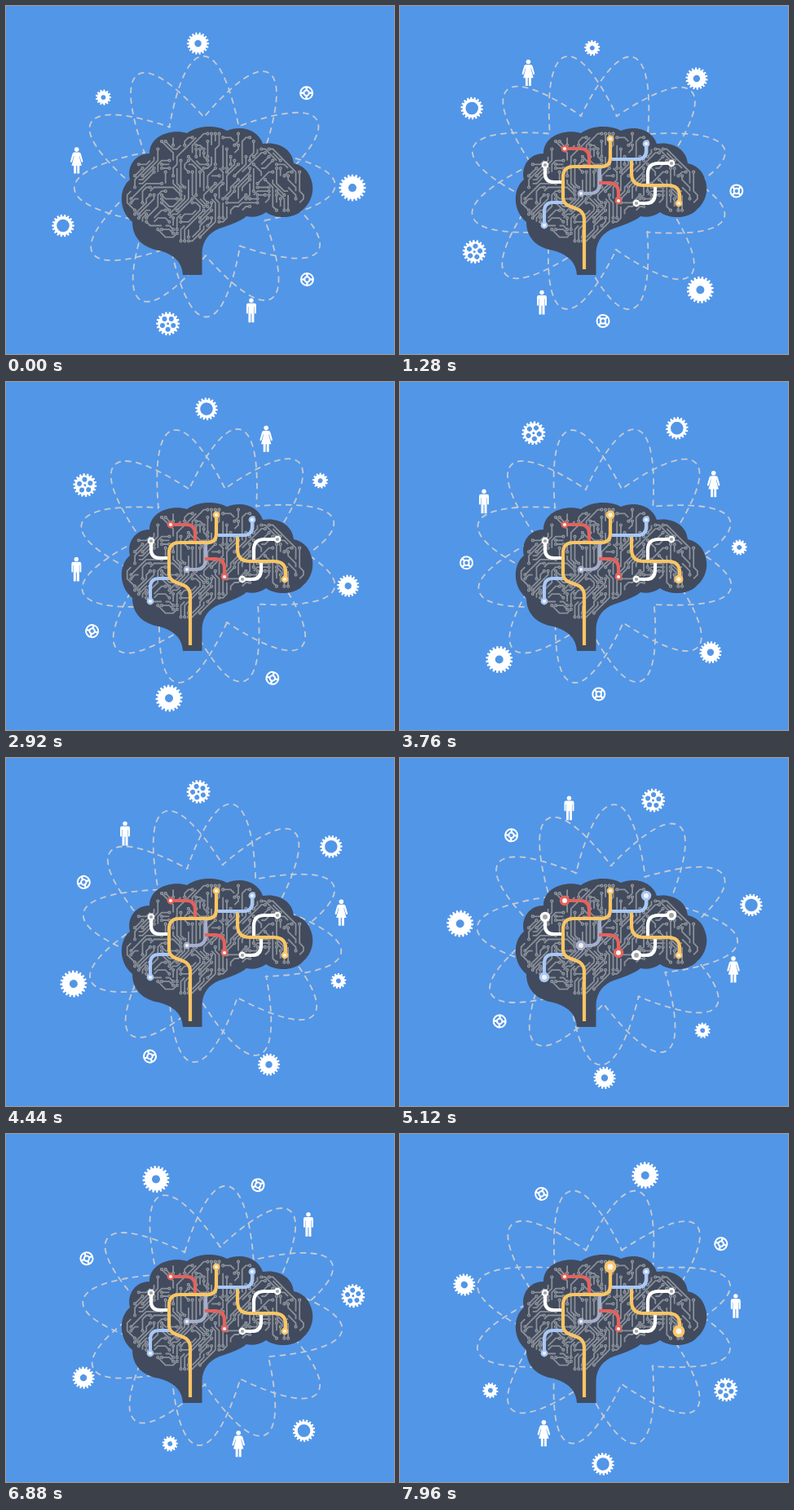
An HTML page that plays this animation: 476 by 427 pixels, repeating every 8 s.

```html
<!DOCTYPE html>
<html lang="en">
<head>
<meta charset="utf-8">
<title>Brain orbit</title>
<style>
html, body { margin: 0; width: 100%; height: 100%; overflow: hidden; background: #5296e8; }
svg { display: block; width: 100vw; height: 100vh; }
</style>
</head>
<body>
<svg id="stage" viewBox="0 0 476 427">
  <rect width="476" height="427" fill="#5296e8"/>
  <g id="orbit">
    <g id="petals" fill="none" stroke="#c6cbd1" stroke-width="1.800" stroke-dasharray="7.500 5.500"/>
    <g id="icons" fill="#fff"/>
  </g>
  <path id="brain" fill="#414b5d" d="M217 330H240.500V303C241 288 249 278 262 273C276 268 288 264 295 258C303 260 312 258 319 253C332 262 354 261 364 250C376 240 379 224 374 212C371 202 363 195 353 193C351 175 334 166 315 169C309 151 288 146 271 153C258 146 236 146 222 156C203 150 176 159 176 181C159 181 148 196 152 213C139 223 137 250 155 265C155 285 169 297 188 300C206 305 216 314 217 330Z"/>
  <path id="traces" fill="none" stroke="#8b9099" stroke-width="1.800" stroke-linejoin="round"/>
  <path id="pads" fill="#5b6370" stroke="#969ba3" stroke-width="1.200"/>
  <g id="wires" fill="none" stroke-width="4.200"/>
  <g id="nodes"/>
</svg>
<script>
const LOOP = 8000, SPEED = 35.9, CX = 249, CY = 219;
const RAD = Math.PI / 180;
const byId = id => document.getElementById(id);
const polar = (r, deg, x = 0, y = 0) => [x + r * Math.cos(deg * RAD), y + r * Math.sin(deg * RAD)];
const pt = p => p.map(v => v.toFixed(2)).join(' ');

function add(parent, tag, attrs = {}) {
  const el = document.createElementNS('http://www.w3.org/2000/svg', tag);
  for (const k in attrs) el.setAttribute(k, attrs[k]);
  return parent.appendChild(el);
}

// Two interlaced rosettes, six petals each
function rosette(start) {
  let d = '';
  for (let i = 0; i < 6; i++) {
    const axis = start + i * 60;
    const at = (u, v) => pt(polar(Math.hypot(u, v), axis + Math.atan2(v, u) / RAD, CX - 5.2, CY + 2.5));
    d += (i ? 'L' : 'M') + at(73.5, -42.5) +
      `C${at(108, -36)} ${at(160, -22)} ${at(160, 0)}C${at(160, 22)} ${at(108, 36)} ${at(73.5, 42.5)}`;
  }
  return d + 'Z';
}
[-0.7, 29.3].forEach(a => add(byId('petals'), 'path', { d: rosette(a) }));

const disc = (r, x = 0, y = 0) => `M${x - r} ${y}a${r} ${r} 0 1 0 ${2 * r} 0a${r} ${r} 0 1 0 ${-2 * r} 0Z`;

function gear(r, teeth, depth) {
  const step = 360 / teeth, pts = [];
  for (let i = 0; i < teeth; i++) {
    [[-.32, r - depth], [-.2, r], [.2, r], [.32, r - depth]]
      .forEach(([f, q]) => pts.push(pt(polar(q, (i + f) * step))));
  }
  return 'M' + pts.join('L') + 'Z';
}

const cog = (r, teeth, depth, hole) => g =>
  add(g, 'path', { d: gear(r, teeth, depth) + disc(hole), 'fill-rule': 'evenodd' });

function wheel(g) {
  let d = gear(14.5, 18, 2.4) + disc(1.5);
  for (let i = 0; i < 5; i++) d += disc(3, ...polar(7, 90 + i * 72));
  add(g, 'path', { d, 'fill-rule': 'evenodd' });
}

function dial(g) {
  const line = { fill: 'none', stroke: '#fff', 'stroke-width': 2 };
  add(g, 'circle', { r: 7.5, ...line });
  add(g, 'circle', { r: 3.2, ...line });
  add(g, 'path', { d: 'M-7 0H-3M3 0H7M0-7V-3M0 3V7', ...line, 'stroke-width': 2.4 });
}

function man(g) {
  add(g, 'circle', { cy: -12.2, r: 2.7 });
  add(g, 'path', { d: 'M-3.800-8.800H3.800Q6-8.800 6-6.500V3Q6 4 5 4Q4 4 4 3V-4.500H3.500V14.800H.5V4H-.5V14.800H-3.500V-4.500H-4V3Q-4 4-5 4Q-6 4-6 3V-6.500Q-6-8.800-3.800-8.800Z' });
}

function woman(g) {
  add(g, 'circle', { cy: -13.3, r: 2.8 });
  add(g, 'path', { d: 'M-3-9.800H3Q4.600-9.800 5.200-8L7.700 1Q7.800 2.200 6.900 2.400Q6 2.500 5.700 1.600L3.500-5.500H3L6.200 6.500H3.500V16.200H.6V6.500H-.6V16.200H-3.500V6.500H-6.200L-3-5.500H-3.500L-5.700 1.600Q-6 2.500-6.900 2.400Q-7.800 2.200-7.700 1L-5.200-8Q-4.600-9.800-3-9.800Z' });
}

const upright = [];
[
  [265.5, 173.5, cog(13.6, 18, 2.5, 4.2)],
  [219.5, 168, cog(9.6, 13, 2, 2.9)],
  [190.3, 165, woman],
  [164.2, 186, cog(13.8, 18, 2.4, 7.8)],
  [106.4, 178, wheel],
  [71.4, 163, man],
  [44, 167.5, dial],
  [1.3, 176, cog(16.5, 20, 2.7, 5)],
  [-43.2, 164, dial]
].forEach(([angle, r, draw]) => {
  const g = add(byId('icons'), 'g', { transform: `translate(${pt(polar(r, angle, CX, CY))})` });
  const inner = add(g, 'g');
  draw(inner);
  if (draw === man || draw === woman) upright.push(inner);
});

// Circuit traces: seeded walks on a grid that never touch each other
function etch() {
  let seed = 29;
  const rnd = () => (seed = seed * 16807 % 2147483647) / 2147483647;
  const STEP = 4.7, used = new Set(), cuts = new Set();
  const brain = byId('brain'), probe = byId('stage').createSVGPoint();
  const dirs = [[0, 1], [1, 1], [1, 0], [1, -1], [0, -1], [-1, -1], [-1, 0], [-1, 1]];
  const xy = (c, r) => [144 + c * STEP, 152 + r * STEP];
  const inside = (x, y) => {
    probe.x = x; probe.y = y;
    return brain.isPointInFill(probe);
  };
  const free = (c, r) => {
    const [x, y] = xy(c, r);
    return y < Math.min(293, 250 + .65 * (x - 144)) && !used.has(c + ',' + r) &&
      dirs.every(([dx, dy]) => inside(x + dx * 4.5, y + dy * 4.5));
  };
  // Slanted on both flanks, mostly upright in the middle
  const leaning = (x, y) => x < 200 ? (y < 200 ? [0, 1, 3] : [3, 3, 2, 1]) :
    x > 305 ? [3, 3, 0, 1] : [0, 0, 0, 3, 1];
  const cells = [];
  for (let c = 0; c < 50; c++) for (let r = 0; r < 31; r++) cells.push([c, r, rnd()]);
  cells.sort((a, b) => a[2] - b[2]);
  let lines = '', pads = '';
  for (const [c0, r0] of cells) {
    if (!free(c0, r0)) continue;
    const zone = leaning(...xy(c0, r0));
    let dir = zone[Math.floor(rnd() * zone.length)] + (rnd() < .5 ? 4 : 0);
    let c = c0, r = r0;
    const path = [xy(c, r)], length = 4 + rnd() * 7;
    used.add(c + ',' + r);
    while (path.length < length) {
      const turn = rnd() < .5 ? 1 : 7;
      const order = rnd() < .2 ? [turn, 0, 8 - turn] : [0, turn, 8 - turn];
      const next = order.map(o => (dir + o) % 8).find(k => {
        const [dx, dy] = dirs[k];
        return free(c + dx, r + dy) && !(dx && dy && cuts.has((2 * c + dx) + ',' + (2 * r + dy)));
      });
      if (next === undefined) break;
      dir = next;
      const [dx, dy] = dirs[dir];
      cuts.add((2 * c + dx) + ',' + (2 * r + dy));
      c += dx; r += dy;
      used.add(c + ',' + r);
      path.push(xy(c, r));
    }
    if (path.length < 3) continue;
    lines += 'M' + path.map(pt).join('L');
    pads += disc(1.5, ...path[path.length - 1]);
    if (rnd() < .3) pads += disc(1.5, ...path[0]);
  }
  byId('traces').setAttribute('d', lines);
  byId('pads').setAttribute('d', pads);
}
etch();

const YELLOW = '#fac564', RED = '#e5625c', BLUE = '#a8c8f6', LILAC = '#a5aecb', WHITE = '#fff';
const wires = [
  [BLUE, 'M260 188H291Q302 188 302 178V169', 302, 169, 350],
  [BLUE, 'M200 241H188Q177 241 177 252V269', 177, 269, 400],
  [LILAC, 'M245 198V217Q245 230 233 230H222', 222, 230, 450],
  [RED, 'M232 196V186Q232 175 221 175H202', 202, 175, 400],
  [RED, 'M244 217H256Q268 217 268 229V239', 268, 239, 500],
  [WHITE, 'M198 216H189Q178 216 178 206V195', 178, 195, 350],
  [WHITE, 'M304 218V206Q304 193 317 193H333', 333, 193, 500],
  [WHITE, 'M313 221V230Q313 242 302 242H290', 290, 242, 550],
  [YELLOW, 'M226 323V262Q226 252 217 249L209 246Q200 243 200 235V210Q200 197 213 197H247Q258 197 258 186V163', 258, 163, 100],
  [YELLOW, 'M284 190V205Q284 220 299 220H328Q343 220 343 233V242', 342, 242, 400]
].map(([color, d, x, y, start]) => {
  const line = add(byId('wires'), 'path', { d, stroke: color });
  const size = line.getTotalLength();
  line.setAttribute('stroke-dasharray', `${size} ${size + 10}`);
  const node = add(byId('nodes'), 'g');
  add(node, 'circle', { r: 4.4, fill: color });
  add(node, 'circle', { r: 2.1, fill: color === WHITE ? '#a3a59f' : '#f4f3ee' });
  return { line, size, node, x, y, start, color };
});

const clamp = v => Math.max(0, Math.min(1, v));
const ease = v => v * v * (3 - 2 * v);

// Swells once every four seconds
function pulse(t, peak) {
  const off = ((t - peak + 6000) % 4000 + 4000) % 4000 - 2000;
  return Math.abs(off) < 400 ? Math.cos(off / 800 * Math.PI) ** 2 : 0;
}

function render(t) {
  const turn = SPEED * t / 1000;
  byId('orbit').setAttribute('transform', `rotate(${turn} ${CX} ${CY})`);
  upright.forEach(el => el.setAttribute('transform', `rotate(${-turn})`));
  for (const w of wires) {
    const span = w.size > 150 ? 950 : 500;
    const grown = ease(clamp((t - w.start) / span));
    w.line.setAttribute('stroke-dashoffset', w.size * (1 - grown));
    w.line.setAttribute('visibility', grown > 0 ? 'visible' : 'hidden');
    const pop = ease(clamp((t - w.start - span + 150) / 200));
    const swell = t < 2000 ? 0 : w.color === YELLOW ? .7 * pulse(t, 4000) : .42 * pulse(t, 5100);
    w.node.setAttribute('transform', `translate(${w.x} ${w.y}) scale(${pop * (1 + swell)})`);
  }
}

function tick() {
  render(performance.now() % LOOP);
  requestAnimationFrame(tick);
}
tick();
</script>
</body>
</html>
```
